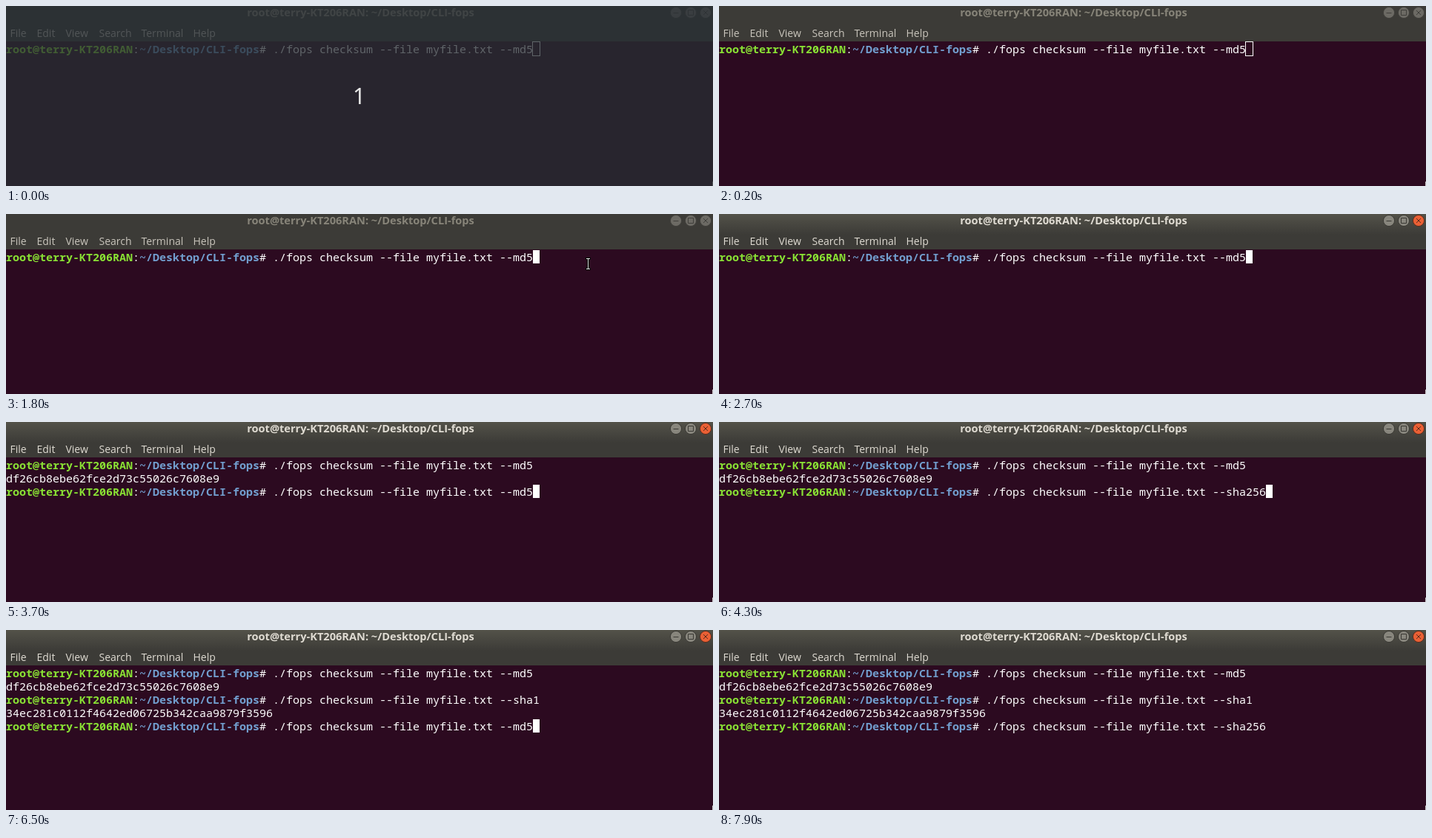
An HTML page with a canvas that plays this animation: 954x244 px, repeating every 8000 ms.

```html
<!DOCTYPE html>
<html lang="en">
<head>
<meta charset="utf-8">
<title>Terminal session</title>
<style>
  html, body { margin: 0; width: 100%; height: 100%; overflow: hidden; background: #2c0a20; }
  canvas { display: block; }
</style>
</head>
<body>
<canvas id="stage" width="954" height="244"></canvas>
<script>
const ctx = document.getElementById('stage').getContext('2d');
const W = 954, H = 244, LOOP = 8000;
const CELL = 9, ROW = 18, TOP = 49, PROMPT_COLS = 40;
const MONO = '15px "Noto Sans Mono", "DejaVu Sans Mono", monospace';
const SANS = '"Open Sans", "Noto Sans", sans-serif';
const HOST = 'root@terry-KT206RAN', DIR = '~/Desktop/CLI-fops';
const COMMAND = './fops checksum --file myfile.txt --';
const SUMS = ['df26cb8ebe62fce2d73c55026c7608e9', '34ec281c0112f4642ed06725b342caa9879f3596'];
const MENU = { File: 5, Edit: 41, View: 80, Search: 125, Terminal: 182, Help: 252 };

// [time, number of finished commands, option on the current line]
const LINES = [
  [0, 0, 'md5'], [2800, 1, ''], [3700, 1, 'md5'], [4000, 1, ''], [4300, 1, 'sha256'],
  [4900, 1, 'sha1'], [5500, 2, ''], [6100, 2, 'sha1'], [6500, 2, 'md5'],
  [7100, 2, ''], [7400, 2, 'sha256']
];
const CARET = [
  [0, 'hollow'], [1800, 'block'], [2300, 'off'], [2700, 'block'], [3300, 'off'],
  [3600, 'block'], [5300, 'off'], [5500, 'block'], [5900, 'off'], [6100, 'block'], [7900, 'off']
];
const POINTER = [
  [0, null], [1100, 'arrow', 783, 40], [1300, 'arrow', 783, 45],
  [1400, 'beam', 786, 57], [1600, 'beam', 785, 60], [2700, null]
];

const at = (track, t) => track.filter(step => step[0] <= t).pop();

function text(str, x, y, color, font, align = 'left') {
  ctx.font = font;
  ctx.fillStyle = color;
  ctx.textAlign = align;
  ctx.fillText(str, x, y);
}

function mono(str, col, row, color = '#fff', bold = false) {
  text(str, col * CELL, TOP + row * ROW + 15, color, (bold ? 'bold ' : '') + MONO);
}

function button(x, fill, ink, kind) {
  ctx.beginPath();
  ctx.arc(x, 9, 7.6, 0, Math.PI * 2);
  ctx.fillStyle = fill;
  ctx.fill();
  ctx.strokeStyle = ink;
  ctx.lineWidth = 1;
  ctx.stroke();
  ctx.beginPath();
  if (kind === 'min') {
    ctx.moveTo(x - 3.5, 9.5);
    ctx.lineTo(x + 3.5, 9.5);
  } else if (kind === 'max') {
    ctx.rect(x - 3.5, 5.5, 7, 7);
  } else {
    ctx.moveTo(x - 3, 6);
    ctx.lineTo(x + 3, 12);
    ctx.moveTo(x + 3, 6);
    ctx.lineTo(x - 3, 12);
  }
  ctx.stroke();
}

function header(active) {
  ctx.fillStyle = '#3c3b37';
  if (active) {
    const shade = ctx.createLinearGradient(0, 0, 0, 28);
    shade.addColorStop(0, '#535249');
    shade.addColorStop(1, '#3c3b37');
    ctx.fillStyle = shade;
  }
  ctx.fillRect(0, 0, W, 48);
  text(`${HOST}: ${DIR}`, 478.5, 14, active ? '#dfdbd2' : '#878479', 'bold 14.6px ' + SANS, 'center');
  const gray = active ? '#88867d' : '#6c6a64', ink = active ? '#3a3934' : '#403f3b';
  button(904, gray, ink, 'min');
  button(924, gray, ink, 'max');
  button(944, active ? '#ea6035' : gray, active ? '#5c2c1c' : ink, 'close');
  for (const name in MENU) text(name, MENU[name] + 0.5, 42, active ? '#dfdbd2' : '#c9c5bc', '14px ' + SANS);
}

function prompt(row, option) {
  mono(HOST, 0, row, '#8ae234', true);
  mono(':', HOST.length, row);
  mono(DIR, HOST.length + 1, row, '#729fcf', true);
  mono('#', PROMPT_COLS - 2, row);
  if (option) mono(COMMAND + option, PROMPT_COLS, row);
}

function caret(kind, col, row) {
  const x = col * CELL, y = TOP + row * ROW;
  if (kind === 'block') {
    ctx.fillStyle = '#fff';
    ctx.fillRect(x, y, CELL, ROW);
  } else if (kind === 'hollow') {
    ctx.strokeStyle = '#fff';
    ctx.lineWidth = 1;
    ctx.strokeRect(x - 0.5, y - 0.5, CELL + 1, ROW + 1);
  }
}

function pointer(kind, x, y) {
  if (kind === 'arrow') {
    const shape = new Path2D('M.5 1V16.5L4 13L6.5 19L9 18L6.5 12H12Z');
    ctx.save();
    ctx.translate(x, y);
    ctx.fillStyle = '#fff';
    ctx.strokeStyle = '#000';
    ctx.lineWidth = 1;
    ctx.fill(shape);
    ctx.stroke(shape);
    ctx.restore();
  } else if (kind === 'beam') {
    for (const [color, grow] of [['#000', 1], ['#e4e4e4', 0]]) {
      ctx.fillStyle = color;
      const bar = (bx, by, w, h) => ctx.fillRect(bx - grow, by - grow, w + 2 * grow, h + 2 * grow);
      bar(x, y + 1, 1, 13);
      bar(x - 2, y, 5, 1);
      bar(x - 2, y + 14, 5, 1);
    }
  }
}

function countdown() {
  ctx.fillStyle = 'rgba(40, 46, 52, 0.74)';
  ctx.fillRect(0, 0, W, H);
  text('1', 468, 133, '#e6e6e6', '30px "Noto Sans", sans-serif');
}

function draw(t) {
  ctx.fillStyle = '#2c0a20';
  ctx.fillRect(0, 0, W, H);
  // sliver of the desktop beside the window corner
  ctx.fillStyle = '#c8c4c6';
  ctx.fillRect(W - 1, H - 6, 1, 6);
  header(t >= 1900);

  const [, done, option] = at(LINES, t);
  for (let i = 0; i < done; i++) {
    prompt(2 * i, ['md5', 'sha1'][i]);
    mono(SUMS[i], 0, 2 * i + 1);
  }
  prompt(2 * done, option);
  const typed = option ? COMMAND.length + option.length : 0;
  caret(at(CARET, t)[1], PROMPT_COLS + typed, 2 * done);

  const [, kind, x, y] = at(POINTER, t);
  pointer(kind, x, y);
  if (t < 200) countdown();
}

const start = performance.now();
function tick() {
  draw((performance.now() - start) % LOOP);
  requestAnimationFrame(tick);
}
tick();
</script>
</body>
</html>
```
